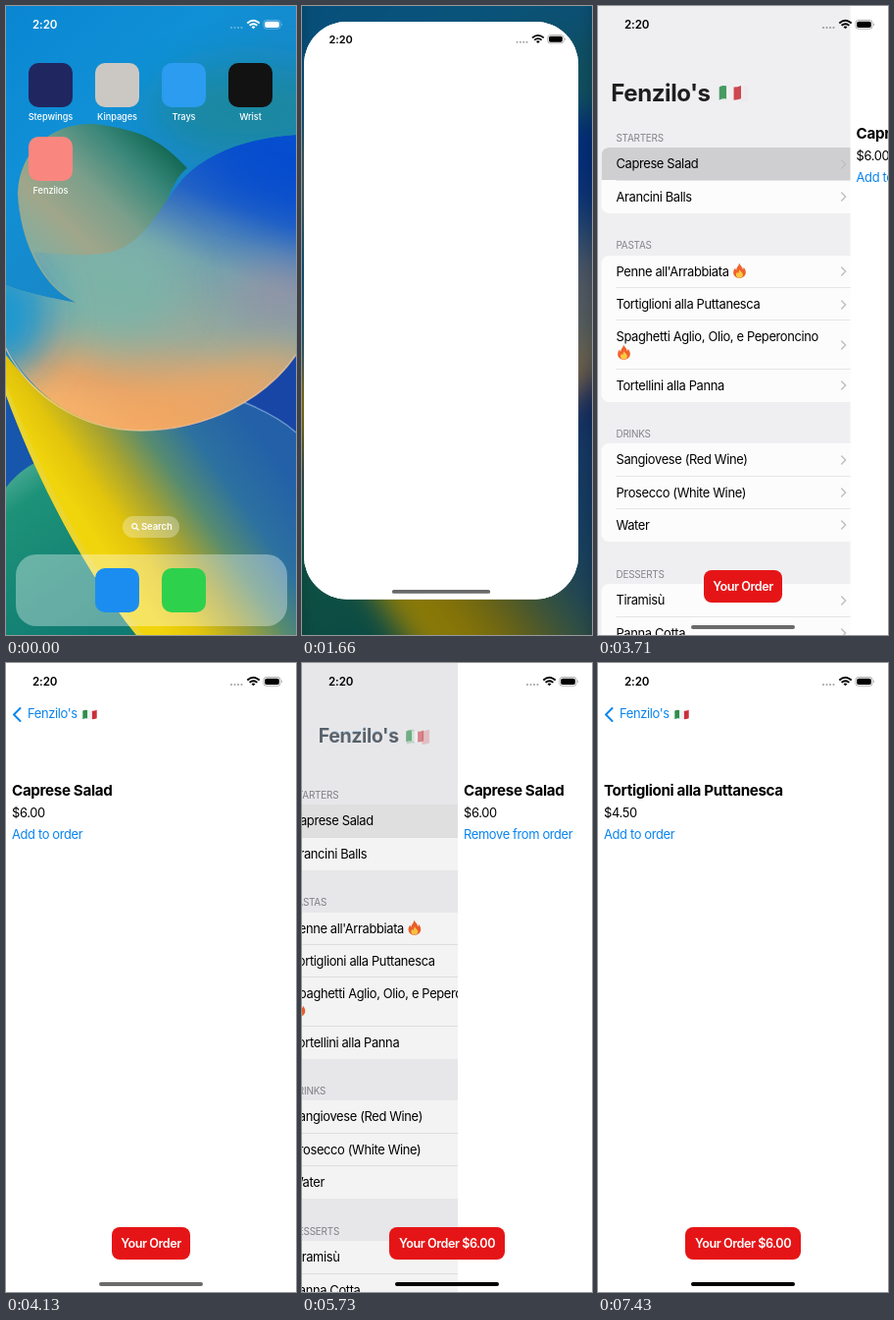
Recreate the animation shown at these times as an HTML page. Size 296x640 px, loop 8 s.

```html
<!DOCTYPE html>
<html lang="en">
<head>
<meta charset="utf-8">
<title>Menu app</title>
<style>
html, body { margin: 0; width: 100%; height: 100%; overflow: hidden; background: #000; }
body { font: 400 12.9px/20px Inter, "Liberation Sans", sans-serif; letter-spacing: -.35px; color: #000; }
#stage { position: relative; width: 296px; height: 640px; overflow: hidden; }
#stage div, .abs { position: absolute; }
.fill { inset: 0; }
.t { white-space: nowrap; line-height: 20px; margin-top: -10px; }
.blue { color: #0a84ee; }
svg { display: block; }

#home { color: #fff; transform-origin: 50% 50%; }
.icon { width: 45px; height: 45px; border-radius: 10px; }
.label { width: 68px; text-align: center; font-size: 9.2px; font-weight: 500; letter-spacing: -.05px; }
#search { left: 119px; top: 519px; width: 58px; height: 22px; border-radius: 11px; background: #ffffff4d; }
#dock { left: 9.5px; top: 558px; width: 277px; height: 73px; border-radius: 21px; background: #ffffff59; }

#app { left: 0; top: 0; width: 296px; background: #fff; overflow: hidden; transform-origin: 0 0; }
#list { inset: 0; background: #f2f2f5; }
#detail { inset: 0; background: #fff; }
#dim { inset: 0; background: #000; }
.head { left: 30px; font-size: 9.9px; letter-spacing: -.2px; color: #85858a; }
.card { left: 15px; width: 266px; border-radius: 8px; background: #fff; overflow: hidden; }
.row { left: 0; width: 266px; }
.row .lit { inset: 0; background: #d1d1d4; opacity: 0; }
.row .line { left: 15px; right: 0; bottom: 0; height: .8px; background: #e8e8ea; }
.row .name { left: 15px; top: 1px; height: 100%; display: flex; align-items: center; white-space: nowrap; line-height: 16.6px; }
.row svg.chev { position: absolute; left: 244px; top: 50%; margin-top: -5px; }
.fire { display: inline-block; width: 14px; height: 16px; margin: -3px 1px; vertical-align: .5px; }
#title, #back { display: flex; align-items: center; left: 0; top: -10px; line-height: 20px; white-space: nowrap; transform-origin: 0 50%; }
#title { font-size: 25.8px; font-weight: 700; letter-spacing: -.45px; }
#title svg { width: 25px; height: 18px; margin-left: 9.5px; }
#back svg { width: 15px; height: 11px; margin-left: 5px; }
#dish { left: 6px; top: 130px; font-size: 15.2px; font-weight: 700; }
#price { left: 6px; top: 153px; }
#link { left: 6px; top: 174.5px; }
#order { top: 573.5px; height: 33px; line-height: 33px; border-radius: 8px; background: #e51517; color: #fff;
  text-align: center; white-space: nowrap; font-size: 12.6px; font-weight: 600; letter-spacing: -.45px; }
#bar { left: 95px; bottom: 6px; width: 105.5px; height: 3.6px; border-radius: 2px; }
.clock { left: 27px; top: 19px; font-size: 11.6px; font-weight: 600; letter-spacing: -.1px; }
</style>
</head>
<body>
<svg width="0" height="0" class="abs">
  <symbol id="flag" viewBox="0 0 25 18">
    <path fill="#2f8f4e" d="M.5 2.5Q4.500 .2 8.700 1.300V15.500Q4.500 14.600 .5 16.800Z"/>
    <path fill="#f1f1f1" d="M8.700 1.300Q12.500 2.600 16.500 2.600V16.800Q12.500 16.700 8.700 15.500Z"/>
    <path fill="#c9303a" d="M16.500 2.600Q21 2.500 24.500 .9V15.200Q21 16.800 16.500 16.800Z"/>
  </symbol>
  <symbol id="fire" viewBox="0 0 14 16">
    <path fill="#f4622c" d="M6.500 .3C7.500 3 10.500 4.800 10.300 7.200C11 6.800 11.200 5.800 11 4.800C13 7 13.600 9 13.300 11C12.800 14 10 15.800 7 15.800C3.600 15.800 .8 13.600 .7 10.500C.6 8.300 1.600 6.900 2.600 5.600C2.700 6.800 3.100 7.400 3.800 7.800C3.500 4.800 6.800 3.500 6.500 .3Z"/>
    <path fill="#ffcb45" d="M7 7C7.200 8.800 10.400 10 10.400 12.500C10.400 14.400 9 15.500 7 15.500C5 15.500 3.500 14.300 3.500 12.400C3.500 11.200 4 10.400 4.700 9.700C5 10.600 5.400 10.900 5.900 11C5.700 9.500 6.800 8.700 7 7Z"/>
  </symbol>
  <symbol id="status" viewBox="0 0 60 14">
    <g fill="currentColor" opacity=".35"><circle cx="3" cy="10" r="1.100"/><circle cx="6.500" cy="10" r="1.100"/><circle cx="10" cy="10" r="1.100"/><circle cx="13.500" cy="10" r="1.100"/></g>
    <g fill="none" stroke="currentColor" stroke-width="1.900">
      <path d="M19.300 5.400Q25.500 .2 31.700 5.400M21.600 7.800Q25.500 4.500 29.400 7.800"/>
    </g>
    <path fill="currentColor" d="M23.500 9.200Q25.500 7.600 27.500 9.200L25.500 11.300Z"/>
    <rect x="35.900" y="2.400" width="17.200" height="8.800" rx="2.800" fill="none" stroke="currentColor" opacity=".4" stroke-width=".8"/>
    <rect x="37.200" y="3.700" width="14.600" height="6.200" rx="1.700" fill="currentColor"/>
    <path d="M54.200 5.300Q56 6.800 54.200 8.300Z" fill="currentColor" opacity=".45"/>
  </symbol>
</svg>

<div id="stage">
  <div id="home" class="fill">
    <svg class="abs" width="296" height="640" viewBox="0 0 296 640">
      <defs>
        <linearGradient id="sky" x2=".4" y2="1">
          <stop stop-color="#0a86d2"/><stop offset=".25" stop-color="#1090d6"/><stop offset=".5" stop-color="#1a86c4"/><stop offset="1" stop-color="#1e5f9f"/>
        </linearGradient>
        <linearGradient id="swirl" gradientUnits="userSpaceOnUse" x1="175" y1="150" x2="45" y2="285">
          <stop stop-color="#0f6650"/><stop offset=".2" stop-color="#39877a"/><stop offset=".45" stop-color="#7b9f8b"/><stop offset=".7" stop-color="#a0a68a"/><stop offset="1" stop-color="#7bb0a4"/>
        </linearGradient>
        <linearGradient id="ball" gradientUnits="userSpaceOnUse" x1="245" y1="140" x2="140" y2="432">
          <stop stop-color="#0750cf"/><stop offset=".2" stop-color="#2464c6"/><stop offset=".42" stop-color="#76a4ae"/><stop offset=".68" stop-color="#a0ab98"/><stop offset=".9" stop-color="#e6a66a"/><stop offset="1" stop-color="#f5b06a"/>
        </linearGradient>
        <linearGradient id="band" gradientUnits="userSpaceOnUse" x1="60" y1="500" x2="223" y2="384">
          <stop stop-color="#f1d50c"/><stop offset=".16" stop-color="#e2c40c"/><stop offset=".34" stop-color="#a6a331"/><stop offset=".52" stop-color="#568b70"/><stop offset=".72" stop-color="#2c71a0"/><stop offset="1" stop-color="#2360a8"/>
        </linearGradient>
        <linearGradient id="leaf" x2=".6" y2="1">
          <stop stop-color="#5fb5a0"/><stop offset=".25" stop-color="#1d9278"/><stop offset="1" stop-color="#0f7a72"/>
        </linearGradient>
        <filter id="soft" x="-50%" y="-60%" width="200%" height="220%"><feGaussianBlur stdDeviation="20"/></filter>
        <clipPath id="disc"><path id="discPath" d="M296 131C245 134 207 150 183 173C160 196 142 250 96 252C75 255 50 252 28 250C38 275 52 290 72 302C40 296 10 290 -8 280V325C10 385 70 432 138 432C205 432 265 400 296 355Z"/></clipPath>
      </defs>
      <rect width="296" height="640" fill="url(#sky)"/>
      <ellipse cx="245" cy="105" rx="95" ry="45" fill="#1f8894" opacity=".75" filter="url(#soft)"/>
      <path fill="#1846a6" d="M150 420L296 350V640H150Z"/>
      <path fill="#1656ac" d="M-4 350L160 640H-4Z"/>
      <path fill="url(#leaf)" d="M-4 495Q15 468 42 460L150 640H-4Z"/>
      <path fill="url(#band)" d="M-4 350C40 410 90 430 138 432C180 432 215 424 240 402C265 412 283 422 296 434V640H133C80 575 30 480 -4 385Z"/>
      <path fill="none" stroke="#86b3dc" stroke-width="1.500" opacity=".7" d="M240 402C265 412 283 422 296 434"/>
      <path fill="#e8d63c" opacity=".7" d="M-4 385C30 480 80 575 133 640H140C87 575 37 480 -4 375Z"/>
      <path fill="url(#swirl)" d="M12 190C14 140 58 112 104 122C140 128 160 138 185 165C150 190 160 300 75 303C40 290 15 245 12 190Z"/>
      <g clip-path="url(#disc)">
        <use href="#discPath" fill="url(#ball)"/>
        <ellipse cx="105" cy="285" rx="75" ry="60" fill="#7ab4a8" opacity=".9" filter="url(#soft)"/>
        <ellipse cx="-2" cy="315" rx="48" ry="60" fill="#1a98d0" filter="url(#soft)"/>
        <ellipse cx="278" cy="180" rx="80" ry="30" fill="#0646cf" opacity=".6" filter="url(#soft)" transform="rotate(14 278 180)"/>
        <ellipse cx="280" cy="292" rx="50" ry="30" fill="#a08aa2" opacity=".65" filter="url(#soft)"/>
        <ellipse cx="205" cy="398" rx="115" ry="28" fill="#f3a661" opacity=".85" filter="url(#soft)" transform="rotate(-17 205 398)"/>
      </g>
      <path d="M12 190C15 245 40 285 72 302" fill="none" stroke="#a79f86" stroke-width="1" opacity=".4"/>
      <path d="M-4 340C20 395 75 432 138 432C205 432 265 400 296 355" fill="none" stroke="#f7cf9c" stroke-width="1.500" opacity=".7"/>
    </svg>
    <div id="front" class="fill">
      <div class="t clock">2:20</div>
      <svg class="abs" style="left:227px;top:12px" width="60" height="14"><use href="#status"/></svg>
      <div id="search">
        <svg class="abs" style="left:9px;top:7px" width="8" height="8" fill="none" stroke="#fff" stroke-width="1.200"><circle cx="3.200" cy="3.200" r="2.500"/><path d="M5 5L7.500 7.500"/></svg>
        <div class="t" style="left:19px;top:11px;font-size:9.5px;font-weight:600;letter-spacing:-.1px">Search</div>
      </div>
      <div id="dock"></div>
    </div>
  </div>

  <div id="app">
    <div id="list"><div id="dim"></div></div>
    <div id="detail">
      <div id="dish" class="t"></div>
      <div id="price" class="t"></div>
      <div id="link" class="t blue"></div>
    </div>
    <svg id="chevron" class="abs" style="left:6px;top:44px" width="11" height="17" fill="none" stroke="#0a84ee" stroke-width="2" stroke-linecap="round" stroke-linejoin="round"><path d="M8.500 2L2 8.500L8.500 15"/></svg>
    <div id="back" class="blue">Fenzilo's<svg><use href="#flag"/></svg></div>
    <div id="title">Fenzilo's<svg><use href="#flag"/></svg></div>
    <div id="order"></div>
    <div id="cover" class="fill" style="background:#fff"></div>
    <div class="t clock">2:20</div>
    <svg class="abs" style="left:227px;top:12px" width="60" height="14"><use href="#status"/></svg>
    <div id="bar"></div>
  </div>
</div>

<script>
const LOOP = 8000, W = 296, H = 640;
const $ = id => document.getElementById(id);
const clamp = v => Math.min(1, Math.max(0, v));
const mix = (a, b, p) => a + (b - a) * p;

function add(parent, cls, css, html = '') {
  const el = document.createElement('div');
  el.className = cls;
  Object.assign(el.style, css);
  el.innerHTML = html;
  parent.append(el);
  return el;
}

// Home screen: column, top, colour, label
[
  [0, 58, '#202660', 'Stepwings'], [1, 58, '#cbc8c4', 'Kinpages'], [2, 58, '#2b9cf0', 'Trays'],
  [3, 58, '#121212', 'Wrist'], [0, 133, '#f9877f', 'Fenzilos'],
  [1, 572, '#1c8df0', ''], [2, 572, '#2ed14c', '']
].forEach(([col, top, background, name]) => {
  const left = 23 + 68 * col;
  add($('front'), 'icon', { left: left + 'px', top: top + 'px', background });
  if (name) add($('front'), 't label', { left: left - 11.5 + 'px', top: top + 55 + 'px' }, name);
});

// Menu: heading, heading centre, card top, dishes
const FIRE = '<svg class="fire"><use href="#fire"/></svg>';
const CHEV = '<svg class="chev" width="7" height="10" fill="none" stroke="#c2c2c6" stroke-width="1.5" stroke-linecap="round" stroke-linejoin="round"><path d="M1.2 1L5.200 5L1.200 9"/></svg>';
const lit = {};
[
  ['STARTERS', 133.5, 144, ['Caprese Salad', 'Arancini Balls']],
  ['PASTAS', 243, 253.5, ["Penne all'Arrabbiata " + FIRE, 'Tortiglioni alla Puttanesca',
    'Spaghetti Aglio, Olio, e Peperoncino<br>' + FIRE, 'Tortellini alla Panna']],
  ['DRINKS', 434.5, 445, ['Sangiovese (Red Wine)', 'Prosecco (White Wine)', 'Water']],
  ['DESSERTS', 577.5, 588, ['Tiramisù', 'Panna Cotta']]
].forEach(([head, y, top, dishes]) => {
  const list = $('list');
  add(list, 't head', { top: y + 'px' }, head);
  const card = add(list, 'card', { top: top + 'px' });
  let h = 0;
  dishes.forEach((dish, i) => {
    const rowH = dish.includes('<br>') ? 49 : 33.4;
    const line = i < dishes.length - 1 ? '<div class="line"></div>' : '';
    const row = add(card, 'row', { top: h + 'px', height: rowH + 'px' },
      `${line}<div class="lit"></div><div class="name"><span>${dish}</span></div>${CHEV}`);
    lit[dish] = row.querySelector('.lit');
    h += rowH;
  });
  card.style.height = h + 'px';
});
$('list').append($('dim'));

// Motion runs in bursts of held steps: start, end, count
const bursts = [[1440, 2240, 8], [2350, 2560, 3], [3590, 4130, 6], [4630, 5090, 5], [5520, 6180, 7], [6880, 7430, 6]];
function held(t) {
  const b = bursts.filter(([start]) => t >= start).pop();
  if (!b) return 0;
  const [start, end, n] = b, step = (end - start) / (n - 1);
  return start + step * Math.min(n - 1, Math.floor((t - start + 10) / step));
}

// Window while opening: time, x, y, width, height, radius
const opening = [
  [1440, 23, 133, 45, 45, 10],
  [1554, 11, 66, 175, 300, 30],
  [1668, 2, 16, 280, 587, 44],
  [1783, .4, 3, 293, 630, 42],
  [1897, 0, 0, W, H, 0]
];
function windowAt(t) {
  const i = opening.findIndex(k => k[0] > t);
  if (i < 0) return opening[opening.length - 1].slice(1);
  const a = opening[i - 1], b = opening[i], p = (t - a[0]) / (b[0] - a[0]);
  return a.map((v, j) => mix(v, b[j], p)).slice(1);
}

const spring = x => 1 - (1 + x) * Math.exp(-x);

// 1 = menu showing, 0 = dish page showing
function menuShown(t) {
  const push = t0 => 1 - spring(Math.max(0, t - t0) * .013);
  if (t < 4125) return push(3650);
  if (t < 5560) return 0;
  if (t < 6175) return spring((t - 5560) * .01);
  return t < 7425 ? push(6940) : 0;
}

function setText(id, s) { if ($(id).textContent !== s) $(id).textContent = s; }

function draw(time) {
  const t = held(time), open = t >= 1440;
  const home = $('home').style, app = $('app').style;

  app.display = open ? 'block' : 'none';
  home.visibility = t < 1890 ? 'visible' : 'hidden';
  const away = open ? clamp((t - 1440) / 228) : 0;
  home.filter = away ? `blur(${14 * away}px) brightness(${1 - .42 * away})` : 'none';
  home.transform = `scale(${1 + .12 * away})`;
  $('front').style.opacity = 1 - away;
  if (!open) return;

  const [x, y, w, h, r] = windowAt(t), s = w / W;
  app.transform = `translate(${x}px,${y}px) scale(${s})`;
  app.height = h / s + 'px';
  app.borderRadius = r / s + 'px';
  $('cover').style.opacity = 1 - clamp((t - 2000) / 300);

  const p = menuShown(t), k = mix(.47, 1, p);
  const at = `translate(${mix(22, 12, p)}px,${mix(52, 94, p)}px)`;
  $('list').style.transform = `translateX(${-.3 * W * (1 - p)}px)`;
  $('dim').style.opacity = .1 * (1 - p);
  $('detail').style.transform = `translateX(${W * p}px)`;
  $('title').style.transform = `${at} scale(${k})`;
  $('title').style.opacity = p;
  $('back').style.transform = `${at} scale(${k / .47})`;
  $('back').style.opacity = (1 - p) ** 2;
  $('chevron').style.opacity = clamp(1 - 2 * p);

  const second = t >= 6875, ordered = t >= 4740;
  lit['Caprese Salad'].style.opacity = t < 3590 ? 0 : t < 5520 ? 1 : second ? 0 : 1 - p;
  lit['Tortiglioni alla Puttanesca'].style.opacity = +second;

  setText('dish', second ? 'Tortiglioni alla Puttanesca' : 'Caprese Salad');
  setText('price', second ? '$4.50' : '$6.00');
  setText('link', ordered && !second ? 'Remove from order' : 'Add to order');
  $('link').style.opacity = t >= 4630 && t < 5090 ? mix(.25, 1, (t - 4630) / 460) : 1;

  setText('order', ordered ? 'Your Order $6.00' : 'Your Order');
  const ow = ordered ? 118 : 80.5;
  $('order').style.left = 148 - ow / 2 + 'px';
  $('order').style.width = ow + 'px';
  $('bar').style.background = t < 5520 ? '#6a6a6a' : '#000';
}

const begin = performance.now();
function tick() {
  draw((performance.now() - begin) % LOOP);
  requestAnimationFrame(tick);
}
tick();
</script>
</body>
</html>
```
